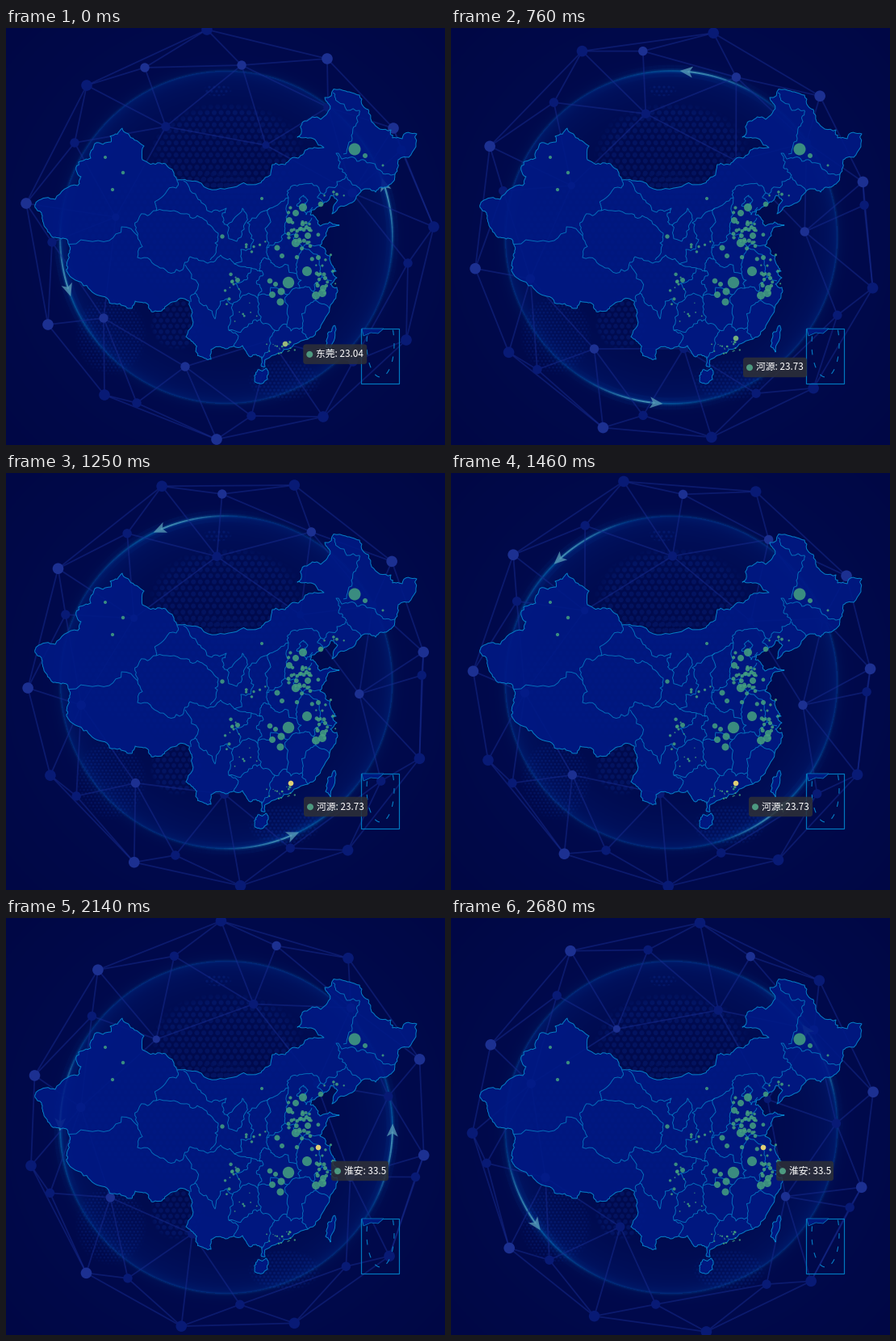
Recreate the animation shown at these times as a matplotlib script. Size 544 by 516 pixels, loop 2.77 s.

```python
import numpy as np
import matplotlib.pyplot as plt
from matplotlib.animation import FuncAnimation
from matplotlib.collections import LineCollection, PolyCollection
from matplotlib.patches import Circle, FancyBboxPatch, Polygon, Rectangle
from matplotlib.transforms import Affine2D
from matplotlib.tri import Triangulation

W, H, LOOP, TICK = 544, 516, 2770, 10
PX = 0.72  # points per pixel at 100 dpi
HUB, R = np.array((273, 259)), 206
EDGE = (0.02, 0.50, 0.78)
GREEN = np.array((0.27, 0.63, 0.50))
YELLOW = np.array((0.88, 0.81, 0.46))
rng = np.random.default_rng(8)

fig = plt.figure(figsize=(W / 100, H / 100), dpi=100, facecolor="#000a4c")
ax = fig.add_axes([0, 0, 1, 1])
ax.set(xlim=(0, W), ylim=(H, 0))
ax.axis("off")

# ---------- backdrop ----------
yy, xx = np.mgrid[0:H, 0:W] + 0.5


def halftone(cx, cy, rx, ry, pitch, r):
    """Hexagonal dots fading out at the rim of an ellipse."""
    step = pitch * 0.87
    row = np.round(yy / step)
    u = xx / pitch - row % 2 / 2
    gap = np.hypot((u - np.round(u)) * pitch, yy - row * step)
    blob = 1 - ((xx - cx) / rx) ** 2 - ((yy - cy) / ry) ** 2
    return np.clip(r + 0.5 - gap, 0, 1) * np.clip(blob * 3, 0, 1)


def backdrop():
    r = np.hypot(xx - HUB[0], yy - HUB[1])
    d = (r / R)[..., None]
    outer = np.array((0, 10, 77)) - np.clip(d - 1, 0, 0.8) * (0, 3, 10)
    inner = np.array((0, 10, 77)) + d ** 5 * (0, 9, 20)
    img = np.where(d < 1, inner, outer)
    img += np.exp(-((r - R) / 1.6) ** 2)[..., None] * (2, 18, 20)
    img += np.exp(-((r - R) / 8) ** 2)[..., None] * (0, 5, 6)
    dots = np.maximum.reduce([
        halftone(274, 155, 98, 64, 8.6, 3),
        halftone(262, 77, 18, 8, 6, 1.6),
        halftone(130, 380, 45, 50, 4.6, 1.3),
        halftone(212, 365, 34, 34, 8, 2.8),
        halftone(345, 436, 46, 26, 5, 1.5),
        halftone(230, 250, 150, 80, 8, 2.6),
    ])
    img += dots[..., None] * (3, 9, 18)
    return np.clip(img, 0, 255).astype(np.uint8)


ax.imshow(backdrop(), extent=(0, W, H, 0), aspect="auto",
          interpolation="nearest", zorder=0)

# ---------- rotating network ----------
RING = [(249, 2), (398, 38), (480, 124), (530, 246), (496, 386), (393, 481),
        (261, 509), (122, 454), (52, 367), (25, 217), (100, 71)]
INNER = [(172, 49), (292, 46), (121, 359), (222, 419), (429, 204), (136, 234),
         (322, 145), (198, 122), (85, 142), (57, 265), (162, 464), (304, 480),
         (498, 291), (490, 151), (399, 98), (328, 386), (430, 413)]
BRIGHT = {1, 2, 6, 8, 9, *range(11, 17)}

nodes = np.array(RING + INNER)
links = nodes[Triangulation(*nodes.T).edges]
links = links[np.hypot(*(links[:, 0] - links[:, 1]).T) < 166]

spin = Affine2D()
spun = spin + ax.transData
ax.add_collection(LineCollection(links, colors=[(0.09, 0.17, 0.56, 0.5)],
                                 linewidths=1.8 * PX, transform=spun, zorder=2))
ids = np.arange(len(nodes))
radius = np.select([ids < 11, (ids == 16) | (ids == 17)], [6.8, 4.6], 5.7)
tint = [(0.11, 0.19, 0.57) if i in BRIGHT else (0.03, 0.10, 0.46) for i in ids]
ax.scatter(*nodes.T, s=(2 * PX * radius) ** 2, c=tint, linewidths=0,
           transform=spun, zorder=2.1)

# ---------- orbiting arrows ----------
orbit = Affine2D()
orbited = orbit + ax.transData


def rim(deg):
    a = np.radians(deg)
    return HUB + R * np.stack([np.cos(a), np.sin(a)], -1)


def streak(lo, hi, alpha, color, width):
    """Two opposite arcs whose opacity follows alpha(angle)."""
    th = np.arange(lo, hi, 1.5)
    segs = [np.stack([rim(th + b), rim(th + b + 1.5)], 1) for b in (0, 180)]
    rgba = np.column_stack([np.tile(color, (len(th), 1)), alpha(th)])
    ax.add_collection(LineCollection(
        np.concatenate(segs), colors=np.tile(rgba, (2, 1)),
        linewidths=width * PX, transform=orbited, zorder=1.5))


def bell(peak, mid, spread):
    return lambda th: peak * np.exp(-((th - mid) / spread) ** 2 / 2)


streak(-45, 51, bell(0.08, 2, 18), (0, 0.35, 0.75), 15)
streak(-45, 51, bell(0.14, 2, 17), (0, 0.45, 0.75), 6)
streak(-40, 46, bell(0.36, 2, 15), (0.05, 0.52, 0.75), 2)
streak(0, 24, lambda th: 0.5 * (1 - th / 24), (0.5, 0.78, 0.8), 2.2)

barb = np.array([(0, -10), (-7, 6), (0, 2), (7, 6)])
heads = [HUB + s * (barb + (R, 0)) for s in (1, -1)]
ax.add_collection(PolyCollection(heads, facecolors=[(0.36, 0.62, 0.72, 0.75)],
                                 edgecolors="none", transform=orbited, zorder=2.2))


# ---------- map ----------
def wiggle(pts, rough=0.15, depth=3):
    """Midpoint displacement, for a natural border."""
    pts = np.asarray(pts, float)
    for _ in range(depth):
        d = np.diff(pts, axis=0)
        bend = rng.normal(0, rough, (len(d), 1)) * d[:, ::-1] * (-1, 1)
        out = np.empty((2 * len(pts) - 1, 2))
        out[::2] = pts
        out[1::2] = (pts[:-1] + pts[1:]) / 2 + bend
        pts = out
    return pts


def land(*pts):
    shape = Polygon(wiggle(pts + pts[:1], 0.11), facecolor=(0, 0.098, 0.525, 0.88),
                    edgecolor=EDGE, linewidth=PX, joinstyle="round", zorder=3)
    return ax.add_patch(shape)


NORTH = [
    (37, 223), (38, 215), (61, 212), (89, 195), (93, 184), (90, 166), (105, 161),
    (110, 143), (130, 141), (129, 134), (144, 124), (153, 133), (171, 146),
    (169, 163), (191, 167), (206, 175), (212, 188), (237, 190), (276, 198),
    (314, 192), (326, 183), (330, 169), (346, 169), (362, 161), (375, 149),
    (394, 148), (378, 136), (361, 135), (370, 115), (390, 113), (400, 94),
    (395, 86), (421, 78), (438, 83), (449, 101), (453, 116), (477, 126),
    (479, 136), (491, 137), (509, 131)]
COAST = [
    (499, 160), (486, 163), (482, 181), (477, 193), (464, 197), (458, 203),
    (448, 199), (429, 216), (404, 230), (411, 213), (403, 207), (392, 218),
    (378, 226), (377, 231), (387, 239), (389, 245), (401, 240), (413, 244),
    (397, 257), (389, 270), (402, 289), (409, 301), (403, 301), (410, 309),
    (402, 317), (410, 321), (407, 336), (392, 365), (374, 385), (353, 396),
    (322, 410), (321, 419), (317, 419), (317, 407), (303, 407)]
SOUTH = [
    (293, 393), (272, 397), (254, 398), (254, 410), (243, 407), (235, 400),
    (232, 389), (223, 382), (231, 352), (227, 338), (206, 339), (193, 350),
    (180, 351), (176, 342), (160, 338), (156, 347), (141, 341), (119, 332),
    (96, 319), (79, 307), (75, 294), (79, 278), (76, 262), (61, 259), (48, 246),
    (45, 232)]
main = land(*NORTH, *COAST, *SOUTH)
land((308, 430), (312, 423), (322, 421), (325, 426), (317, 440), (308, 437))
land((407, 368), (409, 373), (402, 401), (396, 394), (400, 376))

borders = []


def border(*pts):
    borders.append(wiggle(pts))


# west
border((73, 268), (128, 263), (163, 257), (164, 237), (186, 226), (186, 214),
       (211, 198), (212, 188))
border((220, 189), (238, 212), (255, 228), (273, 223), (268, 233), (274, 244))
border((186, 226), (221, 230), (243, 235), (263, 254), (259, 266), (253, 287))
border((163, 257), (163, 284), (191, 297), (219, 299), (228, 283), (250, 291),
       (266, 281), (283, 292))
border((274, 244), (293, 223), (298, 239), (286, 264), (274, 244))
border((222, 293), (234, 328), (229, 339))
border((234, 328), (248, 343), (259, 360), (263, 347), (274, 335), (281, 342))
border((283, 292), (304, 297), (299, 311), (284, 316), (290, 334))
border((304, 297), (319, 305), (311, 317), (312, 335), (293, 331), (281, 342),
       (276, 374), (288, 381), (282, 394))
# south
border((276, 374), (301, 366), (315, 361), (312, 335))
border((315, 361), (333, 374), (328, 390), (316, 410))
border((333, 374), (348, 367), (353, 375), (367, 371), (374, 388))
border((367, 371), (371, 349), (384, 337), (402, 349))
border((348, 367), (349, 330), (328, 321), (312, 331))
border((349, 330), (364, 322), (381, 326), (384, 337))
# centre
border((381, 326), (392, 308), (404, 313))
border((392, 308), (388, 293), (368, 272), (391, 268))
border((364, 322), (360, 304), (361, 288), (368, 272), (358, 267), (360, 250),
       (379, 235))
border((360, 304), (335, 295), (326, 286), (315, 291), (315, 302))
border((360, 256), (346, 254), (338, 265), (323, 272), (326, 286))
border((323, 272), (321, 248), (327, 223), (350, 210), (348, 238), (346, 254))
border((327, 223), (299, 241), (307, 262), (291, 274), (283, 292))
# north
border((350, 210), (349, 201), (369, 193), (390, 204), (386, 210), (394, 220))
border((360, 220), (369, 207), (374, 213), (360, 220))
border((370, 216), (372, 231), (380, 222))
border((390, 204), (410, 190), (422, 182), (412, 173), (409, 155), (426, 160),
       (445, 164), (466, 178), (484, 181))
border((422, 184), (434, 195), (442, 209))
border((418, 156), (428, 133), (435, 113), (438, 102), (411, 91), (405, 80))

lines = LineCollection(borders, colors=[EDGE + (0.85,)], linewidths=0.95 * PX, zorder=3.1)
ax.add_collection(lines)
lines.set_clip_path(main)

# inset of the southern islands
ax.add_patch(Rectangle((439.5, 371.5), 47, 68, fill=False, edgecolor=(0, 0.47, 0.75),
                       linewidth=1.2 * PX, zorder=3))
ax.add_patch(Polygon([(441, 372), (468, 372), (461, 378), (452, 377), (443, 381)],
                     facecolor=(0, 0.1, 0.5), edgecolor=EDGE, linewidth=0.7 * PX, zorder=3))
bay = np.radians(np.linspace(-25, 200, 60))
ax.plot(464 + 17 * np.cos(bay), 391 + 41 * np.sin(bay), color=EDGE, lw=1.1 * PX,
        ls=(0, (6, 9)), zorder=3)


# ---------- cities ----------
def cities(x, y, r):
    ax.scatter(x, y, s=(2 * PX * np.asarray(r)) ** 2, color=[(*GREEN, 0.85)],
               linewidths=0, zorder=4)


def cluster(n, cx, cy, sx, sy, size):
    """Scattered towns, mostly small, around a centre."""
    x, y = rng.normal((cx, cy), (sx, sy), (n, 2)).T
    cities(x, y, size * rng.uniform(0.5, 1.4, n))


cities(*np.transpose([
    (432, 150, 7.5), (350, 315, 7.2), (373, 301, 6), (359, 266, 5.2), (368, 222, 5),
    (384, 331, 5), (392, 328, 5), (341, 326, 4.5), (340, 339, 4.5), (330, 330, 4),
    (374, 257, 4), (351, 238, 4), (359, 229, 4), (393, 322, 4), (390, 218, 3.3),
    (336, 272, 3.5), (327, 313, 3.3), (334, 317, 3), (342, 282, 3), (445, 158, 3),
    (387, 284, 3), (287, 312, 3), (268, 258, 2.7), (145, 179, 2.2), (123, 160, 2),
    (132, 200, 2.1), (317, 211, 2), (467, 170, 1.5)]))
cluster(30, 366, 252, 11, 13, 2.1)
cluster(18, 393, 310, 6, 12, 1.9)
cluster(10, 280, 315, 6, 9, 1.6)
cluster(5, 412, 206, 7, 2, 1.5)
cluster(6, 305, 272, 12, 5, 1.4)
cluster(7, 292, 358, 14, 12, 1.1)
cluster(20, 342, 393, 12, 6, 1)

# ---------- tooltip ----------
TIPS = [  # start ms, label, city
    (-150, "东莞: 23.04", (346, 391)),
    (760, "河源: 23.73", (353, 384)),
    (1648, "淮安: 33.5", (387, 284))]

glow = ax.add_patch(Circle((0, 0), 3.3, linewidth=0, zorder=5))
box = ax.add_patch(FancyBboxPatch((0, 0), 77, 24.5, linewidth=0,
                                  boxstyle="round,pad=0,rounding_size=3.5",
                                  facecolor=(0.18, 0.19, 0.21, 0.85), zorder=6))
bullet = ax.add_patch(Circle((0, 0), 4, linewidth=0, facecolor=(0.3, 0.6, 0.5), zorder=7))
label = ax.text(0, 0, "", color="white", fontsize=11.8 * PX, va="center",
                family="Noto Sans CJK JP", zorder=7)

# ---------- timing ----------
# Runs of even steps: first, last, count. The picture rests in between.
RUNS = [(0, 70, 2), (270, 450, 4), (530, 760, 4), (820, 1000, 3), (1110, 1330, 4),
        (1410, 1460, 2), (1570, 1780, 4), (1880, 2140, 4), (2190, 2440, 4),
        (2550, 2680, 3)]
STEPS = np.concatenate([np.linspace(*run) for run in RUNS])


def draw(i):
    t = STEPS[STEPS <= i * TICK + 0.01].max()
    turn = 3.7 + 0.0175 * t if t else 0  # the loop seam skips a little
    spin.clear().rotate_deg_around(*HUB, turn)
    orbit.clear().rotate_deg_around(*HUB, -18 - 3.9 * turn)

    k = max(j for j, tip in enumerate(TIPS) if tip[0] <= t)
    start, text, city = TIPS[k]
    u = min((t - start) / 400, 1)
    ease = 1 - (1 - u) ** 4
    x, y = (1 - ease) * np.array(TIPS[k - 1][2]) + ease * np.array(city) + (16, 16.7)
    box.set_bounds(x, y, 7 + 8 * len(text), 24.5)
    bullet.center = (x + 8, y + 12.5)
    label.set_position((x + 16, y + 12.3))
    label.set_text(text)
    glow.center = city
    glow.set_facecolor(GREEN + (YELLOW - GREEN) * (0.3 + 0.7 * u))


anim = FuncAnimation(fig, draw, frames=LOOP // TICK, interval=TICK, repeat=True,
                     repeat_delay=0, blit=False, cache_frame_data=False)
plt.show()
```
